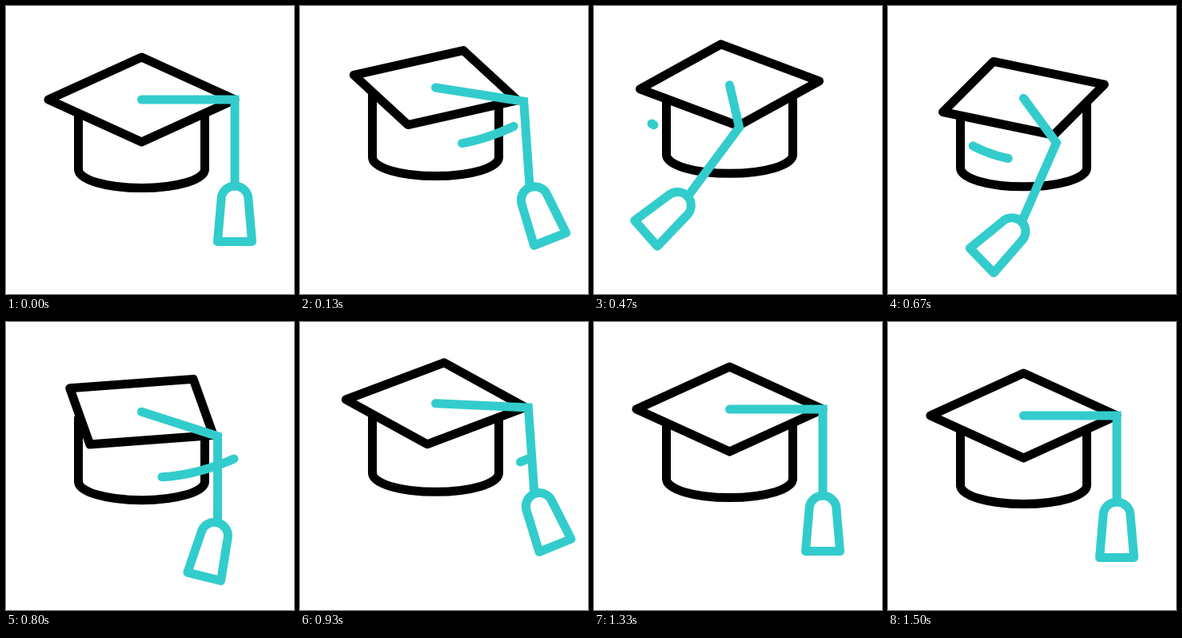
Animation, 360 px wide and 360 px high, one loop 1670 ms. Source, as an HTML page with a canvas:

```html
<!DOCTYPE html>
<html lang="en">
<head>
<meta charset="utf-8">
<title>Graduation cap</title>
<style>
  html, body { margin: 0; overflow: hidden; background: #fff; }
  canvas { display: block; }
</style>
</head>
<body>
<canvas width="360" height="360"></canvas>
<script>
const ctx = document.querySelector('canvas').getContext('2d');
const LOOP = 1670, STEP = 100 / 3;
const CX = 169.5, CY = 117, RX = 116.5, RY = 53;
const BLACK = '#000', TEAL = '#3cc';
const { sin, cos, PI } = Math;

const mix = (a, b, p) => a + (b - a) * p;
const progress = (t, start, end) => Math.min(1, Math.max(0, (t - start) / (end - start)));
const bump = (t, start, end) => sin(PI * progress(t, start, end));

function ease(t, start, end) {
  const p = progress(t, start, end);
  return p * p * (3 - 2 * p);
}

// Halfway between linear and eased
const gentle = (t, start, end) => (progress(t, start, end) + ease(t, start, end)) / 2;

// Two hops: height of the whole cap
const lift = t => 30 * (ease(t, 267, 733) - ease(t, 0, 267)) +
  21 * (ease(t, 1100, 1500) - ease(t, 680, 1067));

// Board turn in eighths of a circle: a quarter turn and back
const turn = t => 2 * (gentle(t, 0, 520) - gentle(t, 550, 976));

// The cord swings with the board; the tag lags behind and overshoots
const cordAngle = t => 40 * (ease(t, 220, 520) - ease(t, 560, 803)) -
  4 * (bump(t, 0, 240) + bump(t, 800, 1060));
const tagAngle = t => 51 * (ease(t, 250, 500) - ease(t, 610, 900)) -
  26 * bump(t, 0, 430) - 22 * bump(t, 800, 1060);
const slack = t => 6 * bump(t, 560, 800);

const rim = u => [CX + RX * cos(u * PI / 4), CY + RY * sin(u * PI / 4)];

// Board corners follow chords between eighths of the rim
function corner(u) {
  const k = Math.floor(u), a = rim(k), b = rim(k + 1);
  return [mix(a[0], b[0], u - k), mix(a[1], b[1], u - k)];
}

function stroke(color, path, join = 'round') {
  ctx.strokeStyle = color;
  ctx.lineJoin = join;
  ctx.stroke(path);
}

// Part of a quadratic curve between two parameters
function shine(from, to, [x0, y0, x1, y1, x2, y2]) {
  if (to <= from) return;
  const path = new Path2D();
  for (let i = 0; i <= 24; i++) {
    const s = mix(from, to, i / 24);
    path.lineTo(mix(mix(x0, x1, s), mix(x1, x2, s), s), mix(mix(y0, y1, s), mix(y1, y2, s), s));
  }
  stroke(TEAL, path);
}

const cup = new Path2D('M90.5 125V204C90.5 217 125 227.5 169.5 227.5S248.5 217 248.5 204V125');
const tag = new Path2D('M-21.5 69.5L-17 17A17 17 0 0 1 17 17L21.5 69.5Z');

function drawCap(u) {
  stroke(BLACK, cup);
  const board = new Path2D();
  for (let i = 0; i < 4; i++) board.lineTo(...corner(u + 2 * i));
  board.closePath();
  ctx.fillStyle = '#fff';
  ctx.fill(board);
  stroke(BLACK, board);
}

function drawTassel(t, u) {
  const [x, y] = rim(u), top = y + slack(t);
  const a = cordAngle(t) * PI / 180;
  const endX = x - 108 * sin(a), endY = top + 108 * cos(a);
  const cord = new Path2D();
  cord.moveTo(CX, CY);
  cord.lineTo(x, top);
  cord.lineTo(endX, endY);
  stroke(TEAL, cord, 'miter');
  ctx.translate(endX, endY);
  ctx.rotate(tagAngle(t) * PI / 180);
  stroke(TEAL, tag);
}

function draw(t) {
  const u = turn(t);
  ctx.clearRect(0, 0, 360, 360);
  ctx.lineWidth = 11;
  ctx.lineCap = 'round';
  ctx.save();
  ctx.translate(0, lift(t));
  drawCap(u);
  drawTassel(t, u);
  ctx.restore();
  shine(1 - ease(t, 20, 325), 1 - ease(t, 120, 495), [72, 147, 160, 201, 268, 150]);
  shine(ease(t, 545, 985), ease(t, 570, 790), [72, 152, 160, 225, 285, 171]);
}

const start = performance.now();
function tick() {
  const t = (performance.now() - start) % LOOP;
  draw(Math.floor(t / STEP + .2) * STEP);
  requestAnimationFrame(tick);
}
tick();
</script>
</body>
</html>
```
